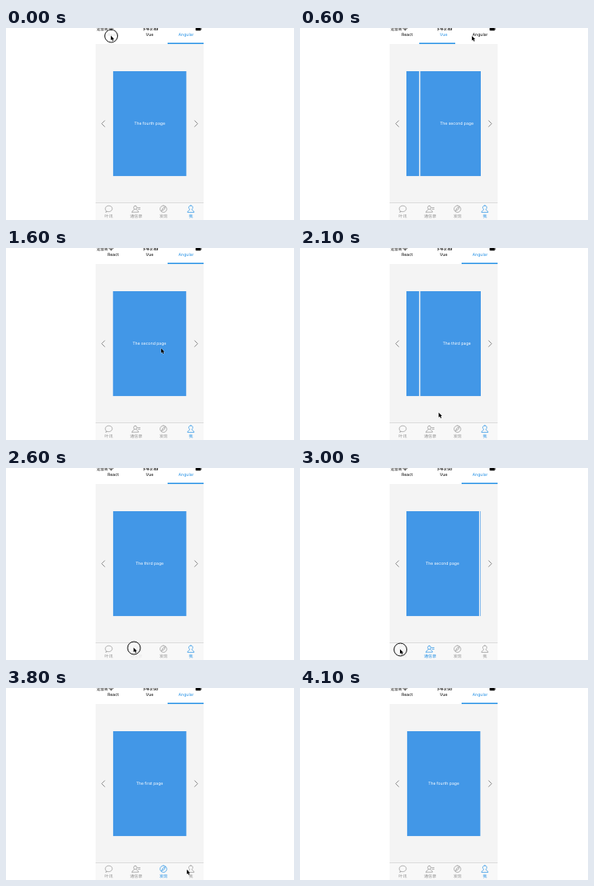
Recreate the animation shown at these times as an HTML page. Size 360 px wide and 240 px high, loop 4200 ms.

```html
<!DOCTYPE html>
<html lang="en">
<head>
<meta charset="utf-8">
<title>Tabs and carousel</title>
<style>
  html, body { margin: 0; width: 100%; height: 100%; overflow: hidden; background: #fff; }
  svg { display: block; width: 360px; height: 240px; }
  text { font-family: Inter, "Noto Sans CJK SC", "Noto Sans CJK", sans-serif; text-anchor: middle;
         text-rendering: geometricPrecision; }
  .slide text { font-size: 5.1px; fill: #fff; }
  .tab { font-size: 5.2px; fill: currentColor; }
  .item { fill: none; stroke: currentColor; stroke-width: .7; stroke-linejoin: round; stroke-linecap: round; }
  .item text { font-size: 5.1px; fill: currentColor; stroke: none; }
  .status { font-size: 4.7px; }
</style>
</head>
<body>
<svg viewBox="0 0 360 240">
  <clipPath id="view"><rect x="133" y="54" width="93" height="131.3"/></clipPath>
  <rect x="112" y="20" width="135" height="220" fill="#f4f4f4"/>

  <g class="status">
    <text x="120.3" y="3.3">运营商</text>
    <text id="clock" x="180.3" y="3.4" font-weight="600"></text>
    <path d="M128.5 .3Q131.4 -2 134.3 .3M129.7 1.5Q131.4 .3 133.1 1.5" fill="none" stroke="#000" stroke-width=".9"/>
    <path d="M130.3 2.1H132.5L131.4 3.3Z"/>
    <rect x="237" y="-1" width="6.6" height="4.3" rx=".8"/>
    <rect x="244.2" y=".3" width=".7" height="1.8" fill="#777"/>
  </g>
  <g id="tabs"></g>
  <rect id="bar" y="18.5" width="45" height="1.5" fill="#2591e5"/>

  <g id="slides" clip-path="url(#view)"></g>
  <path d="M123.6 115.6L119.6 119.6L123.6 123.6M235.6 115.6L239.6 119.6L235.6 123.6"
        fill="none" stroke="#808080" stroke-width=".9"/>

  <rect x="112" y="218.7" width="135" height="21.3" fill="#f8f8f8"/>
  <rect x="112" y="218.4" width="135" height=".6" fill="#ccc"/>
  <g id="items"></g>

  <g id="pointer">
    <circle id="ring" cx=".5" cy=".5" r="8" fill="none" stroke="#111"/>
    <path d="M0 0V5.8L1.4 4.6L2.4 6.8L3.5 6.3L2.5 4.2H4.2Z" stroke="#fff" stroke-width=".5" paint-order="stroke"/>
  </g>
</svg>
<script>
const LOOP = 4200, STEP = 100, EASE = 228, TAP = 100, PITCH = 93;
const BLUE = '#2591e5', GRAY = '#929292';
const $ = id => document.getElementById(id);

$('tabs').innerHTML = ['React', 'Vue', 'Angular']
  .map((name, i) => `<text class="tab" x="${134 + 45.5 * i}" y="9.8">${name}</text>`).join('');

$('slides').innerHTML = ['first', 'second', 'third', 'fourth']
  .map(n => `<g class="slide"><rect x="133.9" y="54" width="91.5" height="131.3" fill="#4297e7"/>
    <text x="179.5" y="121.4">The ${n} page</text></g>`).join('');

// Icons are drawn around their own centre.
const icons = {
  '叶讯': 'M-2.2 3.1C1 4.3 4.4 2.5 4.4-.4C4.4-2.6 2.5-4 .1-4S-4.3-2.5-4.3-.3C-4.3 1-3.8 1.9-3 2.6L-3.4 4Z',
  '通信录': 'M-1-4A2 2.3 0 0 1-1 .6A2 2.3 0 0 1-1-4M-5 4C-4.8 1.7-3.2 1.8-2 .5M0 .5C1.2 1.8 2.8 1.7 3 4H-5M2-1.6H5M2.6 .2H5',
  '发现': 'M0-4.2A4.2 4.2 0 0 1 0 4.2A4.2 4.2 0 0 1 0-4.2M2.4-2.4L.8 .8L-2.4 2.4L-.8-.8Z',
  '我': 'M0-4.2C3.4-4.2 3-.6 1.2 .6C1.2 1.9 4 1.6 4.1 4.2H-4.1C-4 1.6-1.2 1.9-1.2 .6C-3-.6-3.4-4.2 0-4.2Z'
};
$('items').innerHTML = Object.entries(icons).map(([name, d], i) =>
  `<g class="item" transform="translate(${128.4 + 34.2 * i} 226.2)"><path d="${d}"/><text y="10.9">${name}</text></g>`).join('');

// Pointer stops; those with an action are taps.
const stops = [
  { t: 0, x: 131, y: 9.5, tab: 0 },
  { t: 400, x: 177, y: 9.5, tab: 1 },
  { t: 820, x: 223, y: 10, tab: 2 },
  { t: 1000, x: 136, y: 101 },
  { t: 1300, x: 121, y: 120, arrow: 'left' },
  { t: 1500, x: 194, y: 125.5 },
  { t: 1900, x: 238, y: 119, arrow: 'right' },
  { t: 2600, x: 159.5, y: 224.5, item: 1 },
  { t: 3000, x: 125, y: 226.5, item: 0 },
  { t: 3400, x: 196, y: 228, item: 2 },
  { t: 3900, x: 226, y: 227, item: 3 }
];
const turns = { forward: [220, 500, 850, 2000], back: [1400, 2830, 3330, 3850] };

const ease = ms => 1 - (1 - Math.min(1, Math.max(0, ms / EASE))) ** 3;
const mix = (a, b, p) => a + (b - a) * p;
const turned = (times, t) => times.reduce((sum, start) => sum + ease(t - start), 0);
const tapsOn = kind => stops.filter(s => kind in s);

// The pointer leaves each stop as soon as the tap there is over.
const pointerAt = (axis, t) => stops.reduce((v, s, i) =>
  i ? mix(v, s[axis], ease(t - stops[i - 1].t - TAP)) : s[axis], 0);

function paint(group, kind, initial, idle, t) {
  const taps = tapsOn(kind);
  const active = taps.findLast(s => t >= s.t + TAP)?.[kind] ?? initial;
  const pressed = taps.find(s => t >= s.t && t <= s.t + TAP)?.[kind];
  [...group.children].forEach((el, i) => {
    el.style.color = i === active ? BLUE : idle;
    el.style.opacity = i === pressed ? .15 : 1;
  });
}

function draw(t) {
  paint($('tabs'), 'tab', 2, '#000', t);
  paint($('items'), 'item', 3, GRAY, t);
  const bar = tapsOn('tab').reduce((v, s) => mix(v, s.tab, ease(t - s.t - TAP)), 2);
  $('bar').setAttribute('x', 112 + 45 * bar);
  $('clock').textContent = t < 3000 ? '下午3:49' : '下午3:50';

  const page = 3 + turned(turns.forward, t) - turned(turns.back, t);
  [...$('slides').children].forEach((el, i) => {
    const offset = (i - page + 10) % 4 - 2;
    el.setAttribute('transform', `translate(${offset * PITCH} 0)`);
  });

  const tapping = stops.some(s => (s.tab ?? s.item ?? s.arrow) !== undefined && t >= s.t && t < s.t + TAP);
  $('pointer').setAttribute('transform', `translate(${pointerAt('x', t)} ${pointerAt('y', t)})`);
  $('pointer').style.display = t < LOOP - STEP ? '' : 'none';
  $('ring').style.display = tapping ? '' : 'none';
}

const begin = performance.now();
function tick() {
  const t = (performance.now() - begin) % LOOP;
  draw(Math.floor(t / STEP) * STEP);
  requestAnimationFrame(tick);
}
tick();
</script>
</body>
</html>
```
